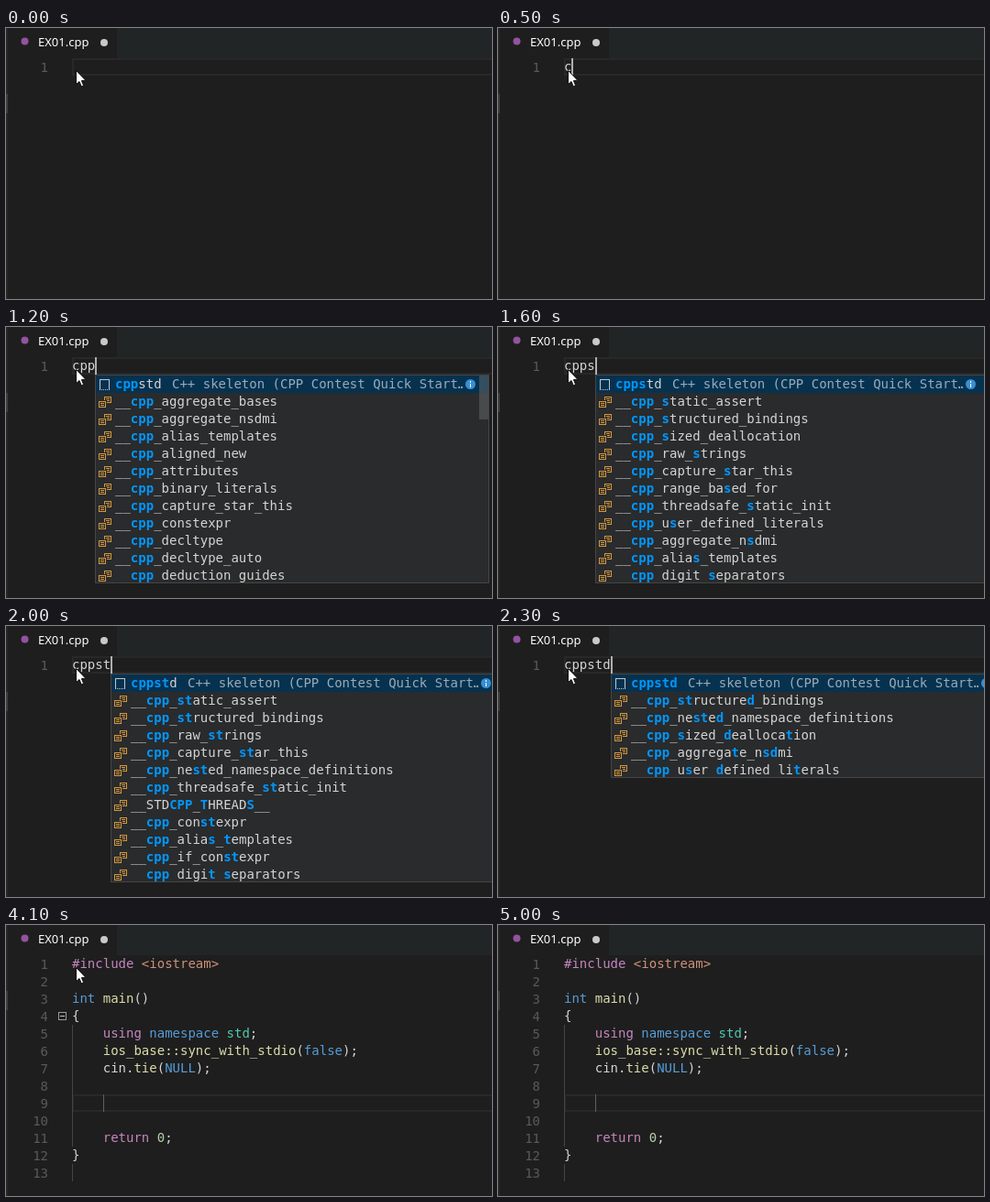
These frames come from a looping animation (530x296 px, 5.1 s). An HTML page with a canvas:

```html
<!DOCTYPE html>
<html lang="en">
<head>
<meta charset="utf-8">
<title>Snippet completion</title>
<style>
  html, body { margin: 0; width: 100%; height: 100%; overflow: hidden; background: #1e1e1e; }
  canvas { display: block; }
</style>
</head>
<body>
<canvas id="stage" width="530" height="296"></canvas>
<script>
const ctx = document.getElementById('stage').getContext('2d');
const LOOP = 5100, ROW = 19, TOP = 33, LEFT = 72;
const MONO = '14px "DejaVu Sans Mono", monospace';
const PLAIN = '#d4d4d4', PINK = '#c586c0', BLUE = '#569cd6', YELLOW = '#dcdcaa';
const POPUP = '#292b2d', SELECTED = '#063250';

// Matched letters are in square brackets.
const keywords = 'case catch char char16_t char32_t class compl concept const const_cast constexpr continue'
  .split(' ').map(word => word.replace('c', '[c]'));
const features = ('aggregate_bases aggregate_nsdmi alias_templates aligned_new attributes binary_literals ' +
  'capture_star_this constexpr decltype decltype_auto deduction_guides').split(' ');
const macros = names => names.split(' ').map(name => '__[cpp]_' + name);

const stMatches = macros('[st]atic_assert [st]ructured_bindings raw_[st]rings capture_[st]ar_this ' +
  'ne[st]ed_namespace_definitions threadsafe_[st]atic_init');
stMatches.push('__STD[CPP]_[T]HREAD[S]__',
  ...macros('con[st]expr alia[s]_[t]emplates if_con[st]expr digi[t]_[s]eparators'));

const popups = [
  { from: 600, to: 900, col: 1, thumb: 20, items: keywords },
  { from: 900, to: 1200, col: 2, thumb: 48, items: ['[cp]pstd', ...features.map(f => '__[cp]p_' + f)] },
  { from: 1200, to: 1600, col: 3, thumb: 48, items: ['[cpp]std', ...features.map(f => '__[cpp]_' + f)] },
  { from: 1600, to: 2000, col: 4, items: ['[cpps]td', ...macros('[s]tatic_assert [s]tructured_bindings ' +
    '[s]ized_deallocation raw_[s]trings capture_[s]tar_this range_ba[s]ed_for threadsafe_[s]tatic_init ' +
    'u[s]er_defined_literals aggregate_n[s]dmi alia[s]_templates digit_[s]eparators')] },
  { from: 2000, to: 2300, col: 5, items: ['[cppst]d', ...stMatches] },
  { from: 2300, to: 2600, col: 6, items: ['[cppstd]', ...macros('[st]ructure[d]_bindings ' +
    'ne[st]e[d]_namespace_definitions [s]ized_[d]ealloca[t]ion aggrega[t]e_n[sd]mi u[s]er_[d]efined_li[t]erals')] }
];

const typingTimes = [500, 900, 1200, 1600, 1900, 2300];
const blinkTimes = [100, 3100, 3600, 4100, 4600, 5000];

const indent = ['    ', PLAIN];
const code = [
  [['#include ', PINK], ['<iostream>', '#ce9178']],
  [],
  [['int ', BLUE], ['main', YELLOW], ['()', PLAIN]],
  [['{', PLAIN]],
  [indent, ['using ', PINK], ['namespace ', BLUE], ['std', '#4ec9b0'], [';', PLAIN]],
  [indent, ['ios_base::sync_with_stdio', YELLOW], ['(', PLAIN], ['false', BLUE], [');', PLAIN]],
  [indent, ['cin.', PLAIN], ['tie', YELLOW], ['(', PLAIN], ['NULL', BLUE], [');', PLAIN]],
  [], [], [],
  [indent, ['return ', PINK], ['0', '#b5cea8'], [';', PLAIN]],
  [['}', PLAIN]],
  []
];

function rect(x, y, w, h, color) {
  ctx.fillStyle = color;
  ctx.fillRect(x, y, w, h);
}

function frame(x, y, w, h, color) {
  ctx.strokeStyle = color;
  ctx.lineWidth = 1;
  ctx.strokeRect(x + .5, y + .5, w - 1, h - 1);
}

function disc(x, y, r, color) {
  ctx.fillStyle = color;
  ctx.beginPath();
  ctx.arc(x, y, r, 0, 7);
  ctx.fill();
}

// Draws text and returns the x where it ends.
function text(str, x, y, color, font = MONO) {
  ctx.font = font;
  ctx.fillStyle = color;
  ctx.fillText(str, x, y);
  return x + ctx.measureText(str).width;
}

const lineTop = n => TOP + (n - 1) * ROW;

function caretX(col) {
  ctx.font = MONO;
  return Math.round(LEFT + ctx.measureText(' '.repeat(col)).width);
}

function drawWindow() {
  rect(0, 0, 530, 296, '#1e1e1e');
  rect(121, 0, 409, TOP, '#222525');
  rect(0, 0, 2, 296, '#252626');
  rect(0, 72, 2, 21, '#3c3d3d');
  disc(20.5, 14.5, 4, '#9253a0');
  text('EX01.cpp', 35, 20, '#ffffff', '13px "Noto Sans", sans-serif');
  disc(107, 16, 4, '#c9c9c9');
}

function drawCurrentLine(n) {
  const y = lineTop(n);
  rect(LEFT, y, 458, 2, '#282828');
  rect(LEFT, y + 17, 458, 2, '#282828');
  rect(LEFT, y, 2, ROW, '#282828');
}

function drawLineNumber(n) {
  ctx.textAlign = 'right';
  text(n, 46, lineTop(n) + 15, '#5a5a5a');
  ctx.textAlign = 'left';
}

function drawCaret(col, line) {
  rect(caretX(col), lineTop(line), 2, ROW, '#aeafad');
}

// Icons are drawn on a 16 pixel square.
function keywordIcon(x, y) {
  const grey = '#c5c5c5';
  frame(x + 1, y + 2, 7, 3, grey);
  [[10, 3, 5], [1, 7, 9], [12, 7, 2], [1, 10, 6], [10, 10, 5], [1, 13, 11]]
    .forEach(([dx, dy, w]) => rect(x + dx, y + dy, w, 1, grey));
}

function snippetIcon(x, y) {
  const grey = '#c5c5c5';
  rect(x + 2, y + 2, 11, 1, grey);
  rect(x + 2, y + 2, 1, 11, grey);
  rect(x + 12, y + 2, 1, 11, grey);
  for (let i = 2; i < 13; i += 2) rect(x + i, y + 13, 1, 1, grey);
}

function macroIcon(x, y) {
  const orange = '#d6983d';
  frame(x + 7, y + 2, 8, 7, orange);
  rect(x + 9, y + 4, 4, 1, orange);
  rect(x + 10, y + 6, 3, 1, orange);
  rect(x, y + 6, 10, 9, POPUP);
  frame(x + 1, y + 7, 8, 7, orange);
  rect(x + 3, y + 9, 4, 1, orange);
  rect(x + 3, y + 11, 4, 1, orange);
}

function drawInfo(x, y) {
  disc(x, y, 5.5, '#3a8fd0');
  rect(x - .5, y - 3.5, 1, 2, '#ffffff');
  rect(x - .5, y - .5, 1, 4, '#ffffff');
}

function drawPopup({ col, items, thumb }, t) {
  const x = caretX(col), y = TOP + ROW, w = 430, h = items.length * ROW;
  const detail = '#9aabb7';
  rect(x, y, w, h, POPUP);
  rect(x, y + 1, w, ROW, SELECTED);
  items.forEach((item, i) => {
    const rowY = y + 1 + i * ROW;
    const icon = col === 1 ? keywordIcon : i ? macroIcon : snippetIcon;
    icon(x + 3, rowY + 2);
    let end = x + 22;
    item.split(/[[\]]/).forEach((part, k) => {
      end = k % 2
        ? text(part, end, rowY + 14, '#0097fb', 'bold ' + MONO)
        : text(part, end, rowY + 14, PLAIN);
    });
  });
  if (col === 1) text('C++ keyword', x + 307, y + 15, detail);
  else text('C++ skeleton (CPP Contest Quick Start…', x + 84, y + 15, detail);
  rect(x + 402, y + 1, 28, ROW, SELECTED);
  drawInfo(x + 409.5, y + 10.5);
  // The scrollbar fades in when the list first opens.
  if (thumb) rect(x + w - 11, y + 1, 10, thumb, `rgba(121,121,121,${t < 700 ? .15 : .4})`);
  frame(x, y, w, h, '#454545');
}

function drawFold(opacity) {
  ctx.globalAlpha = opacity;
  frame(57, 95, 9, 9, '#9a9a9a');
  rect(59, 99, 5, 1, '#c5c5c5');
  ctx.globalAlpha = 1;
}

function drawProgram(t) {
  drawCurrentLine(9);
  rect(LEFT, lineTop(5), 1, 7 * ROW, '#454545');
  rect(LEFT, lineTop(13), 1, ROW, '#454545');
  rect(106, lineTop(9), 1, ROW, '#606060');
  code.forEach((tokens, i) => {
    drawLineNumber(i + 1);
    let x = LEFT;
    for (const [str, color] of tokens) x = text(str, x, lineTop(i + 1) + 14, color);
  });
  const fadeStep = Math.floor((t - 4400) / 100);
  if (t >= 2800 && t < 4800) drawFold(Math.min(1, 1 - fadeStep / 4));
}

function drawTyping(t) {
  const typed = 'cppstd'.slice(0, typingTimes.filter(time => t >= time).length);
  drawCurrentLine(1);
  drawLineNumber(1);
  text(typed, LEFT, TOP + 14, PLAIN);
  const popup = popups.find(p => t >= p.from && t < p.to);
  if (popup) drawPopup(popup, t);
  return typed.length;
}

function drawPointer(x, y) {
  ctx.beginPath();
  [[.5, .5], [.5, 15.5], [4, 12.5], [6.2, 17.8], [8.6, 16.8], [6.4, 11.6], [10.8, 11.2]]
    .forEach(([dx, dy]) => ctx.lineTo(x + dx, y + dy));
  ctx.closePath();
  ctx.fillStyle = '#ffffff';
  ctx.strokeStyle = '#111111';
  ctx.lineWidth = 1;
  ctx.fill();
  ctx.stroke();
}

function draw(now) {
  const t = now % LOOP;
  drawWindow();
  const caretOn = blinkTimes.filter(time => t >= time).length % 2 === 1;
  if (t < 2600) {
    const col = drawTyping(t);
    if (caretOn) drawCaret(col, 1);
  } else {
    drawProgram(t);
    if (caretOn) drawCaret(4, 9);
  }
  if (t < 4300) drawPointer(76, 46);
  else if (t >= 4500 && t < 4600) drawPointer(80, 12);
  requestAnimationFrame(draw);
}
requestAnimationFrame(draw);
</script>
</body>
</html>
```
